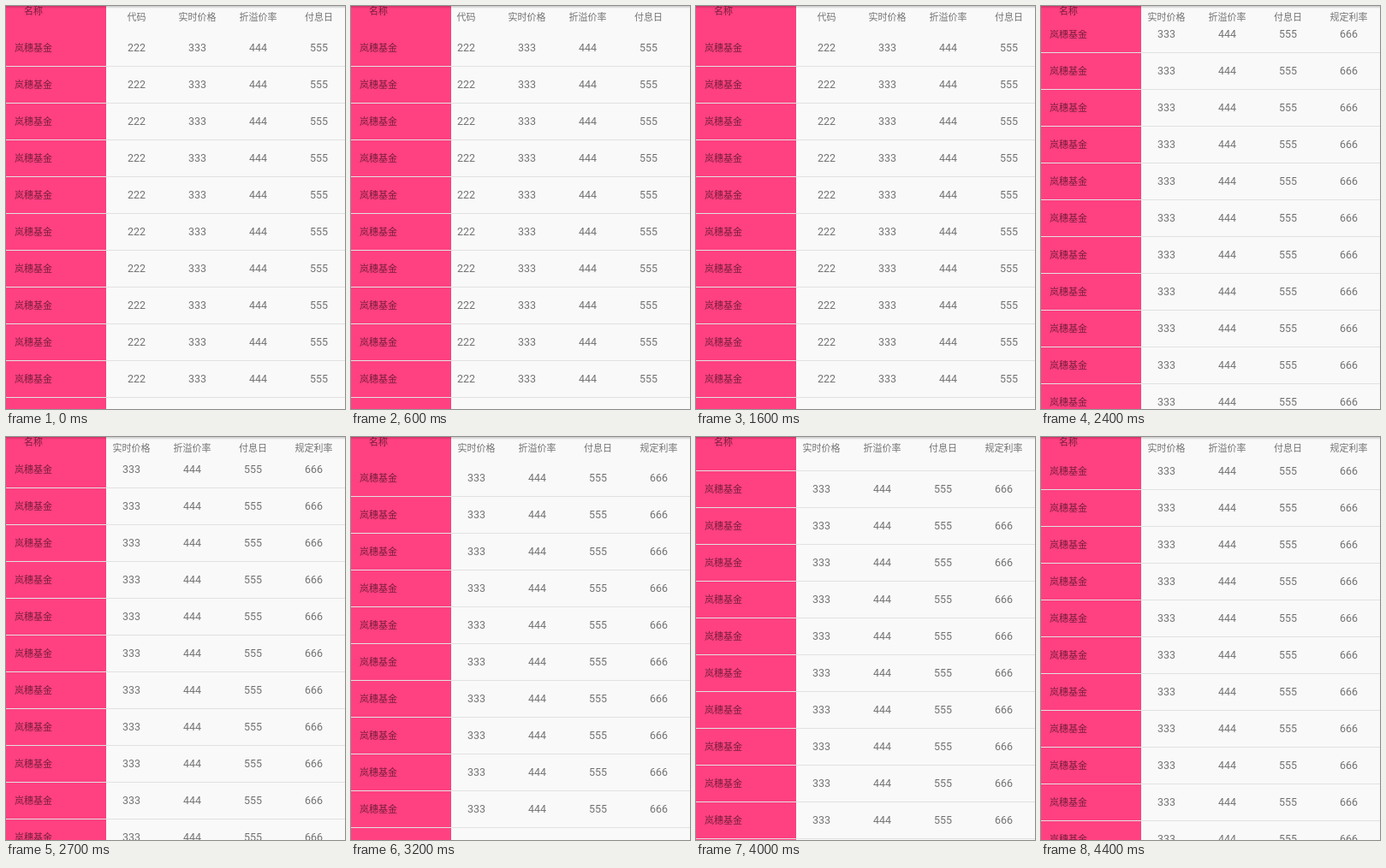
An HTML page that plays this animation: 396x471 px, repeating every 6.6 s.

```html
<!DOCTYPE html>
<html lang="zh-CN">
<head>
<meta charset="utf-8">
<title>基金列表</title>
<style>
  html, body { margin: 0; width: 100%; height: 100%; overflow: hidden; background: #f9f9f9; }
  #stage {
    position: relative; width: 396px; height: 471px; overflow: hidden;
    font: 11px Roboto, "Noto Sans CJK SC", "Noto Sans CJK", sans-serif;
    color: rgba(0, 0, 0, .54); white-space: nowrap;
  }
  #stage div { position: absolute; }
  .pane { top: 0; height: 471px; overflow: hidden; }
  #names { left: 0; width: 117px; background: #ff4081; }
  #data { left: 117px; width: 279px; background: #f9f9f9; }
  .body { top: 28px; left: 0; width: 100%; height: 443px; overflow: hidden; }
  .rows, .slide { top: 0; left: 0; width: 100%; }
  .row { left: 0; width: 100%; height: 42px; line-height: 42px; border-bottom: 1px solid #e1e1e1; }
  #names .row { text-indent: 10px; line-height: 44px; }
  .cell { width: 71px; text-align: center; }
  .row .cell { font-size: 12.5px; }
  #title { left: 21px; line-height: 14px; }
  .head { line-height: 28px; }
  #shadow { top: 0; left: 0; width: 100%; height: 3px; background: linear-gradient(rgba(0, 0, 0, .2), transparent); }

  .slide { animation: slide 6.6s step-end infinite; }
  .rows { animation: scroll 6.6s step-end infinite; }

  @keyframes slide {
    0% { transform: translateX(0); }
    9.09% { transform: translateX(-18px); }
    10.6% { transform: translateX(-46px); }
    12.12% { transform: translateX(-70px); }
    13.63% { transform: translateX(-77px); }
    19.69% { transform: translateX(-64px); }
    21.21% { transform: translateX(-36px); }
    22.72% { transform: translateX(-9px); }
    24.24% { transform: translateX(0); }
    27.27% { transform: translateX(-24px); }
    28.78% { transform: translateX(-62px); }
    30.3%, 100% { transform: translateX(-77px); }
  }
  @keyframes scroll {
    0% { transform: translateY(0); }
    36.36% { transform: translateY(-16px); }
    37.87% { transform: translateY(-46px); }
    39.39% { transform: translateY(-76px); }
    40.9% { transform: translateY(-97px); }
    42.42% { transform: translateY(-104px); }
    48.48% { transform: translateY(-87px); }
    50% { transform: translateY(-64px); }
    51.51% { transform: translateY(-44px); }
    53.03% { transform: translateY(-28px); }
    54.54% { transform: translateY(-16px); }
    56.06% { transform: translateY(-8px); }
    57.57% { transform: translateY(-4px); }
    59.09% { transform: translateY(-14px); }
    60.6% { transform: translateY(-31px); }
    62.12% { transform: translateY(-45px); }
    63.63% { transform: translateY(-51px); }
    66.66%, 100% { transform: translateY(-52px); }
  }
</style>
</head>
<body>
<div id="stage">
  <div id="names" class="pane">
    <div id="title">名称</div>
    <div class="body"><div class="rows"></div></div>
  </div>
  <div id="data" class="pane">
    <div class="slide head"></div>
    <div class="body"><div class="rows"></div></div>
  </div>
  <div id="shadow"></div>
</div>
<script>
  const ROWS = 14, ROW_HEIGHT = 43, COLUMN_WIDTH = 71;
  const columns = ['代码', '实时价格', '折溢价率', '付息日', '规定利率'];

  const cells = labels => labels.map((label, i) =>
    `<div class="cell" style="left:${i * COLUMN_WIDTH}px">${label}</div>`).join('');

  const rows = content => Array.from({ length: ROWS }, (_, i) =>
    `<div class="row" style="top:${i * ROW_HEIGHT}px">${content}</div>`).join('');

  const values = columns.map((_, i) => String(i + 2).repeat(3));

  document.querySelector('.head').innerHTML = cells(columns);
  document.querySelector('#names .rows').innerHTML = rows('岚穗基金');
  document.querySelector('#data .rows').innerHTML = rows(`<div class="slide">${cells(values)}</div>`);
</script>
</body>
</html>
```
